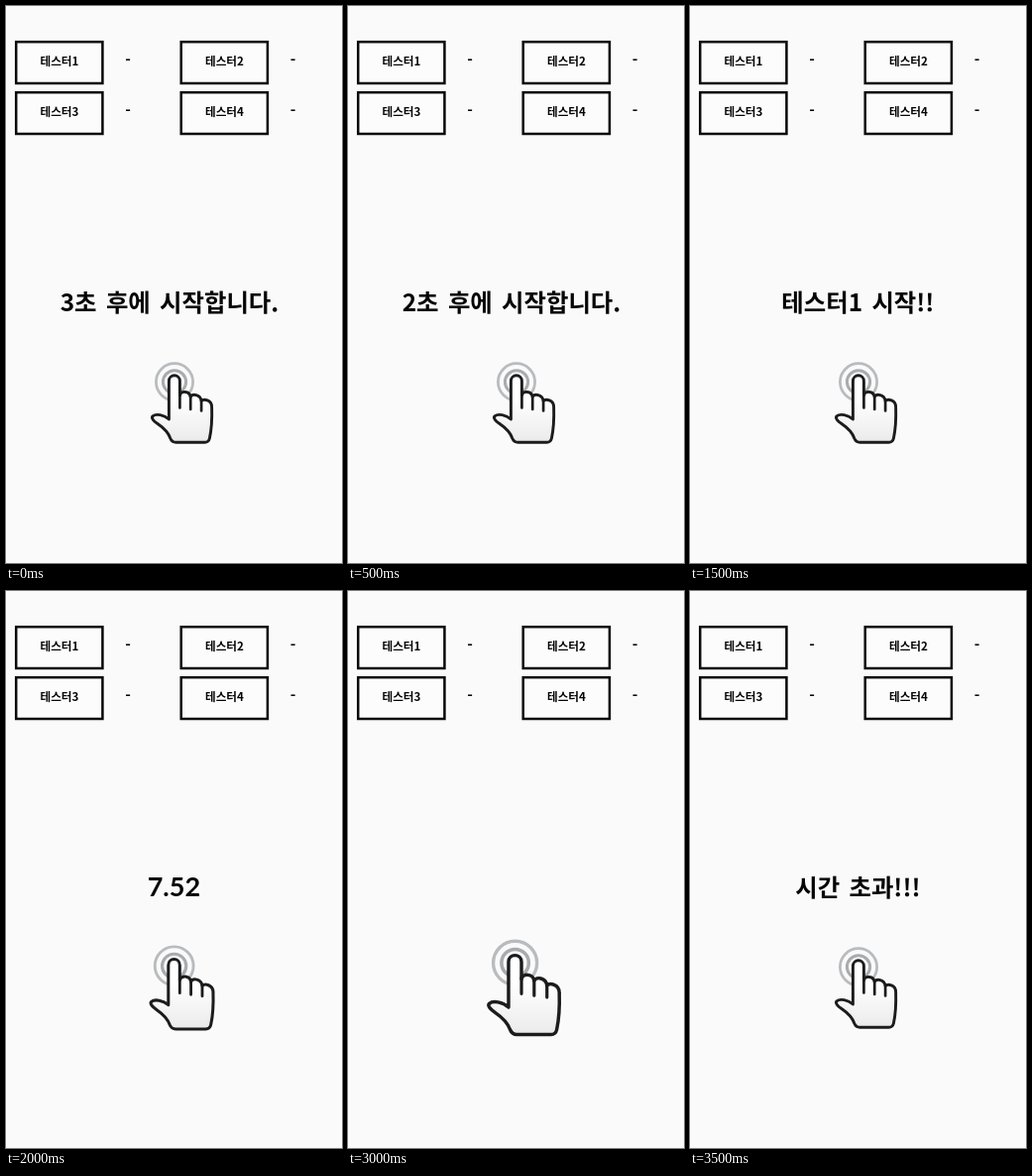
An HTML page for the animation above (4000 ms loop, 339x562 px).

```html
<!DOCTYPE html>
<html lang="ko">
<head>
<meta charset="utf-8">
<title>Tap timer</title>
<style>
html, body { margin: 0; width: 100%; height: 100%; overflow: hidden; background: #fafafa; }
svg { display: block; width: 100vw; height: 100vh; }
text { font-family: "Noto Sans CJK KR", "Noto Sans CJK", sans-serif; font-weight: 900; text-anchor: middle; fill: #050505; }
.label { font-size: 11.6px; }
.score { font-size: 15px; }
#message { font-size: 24.4px; word-spacing: 2.5px; }
#message.digits { font-family: Lato, sans-serif; font-size: 27px; font-weight: 700; word-spacing: 0; }
</style>
</head>
<body>
<svg viewBox="0 0 339 562">
  <defs>
    <linearGradient id="skin" x1="0" y1="0" x2="0" y2="1">
      <stop offset=".35" stop-color="#fff"/>
      <stop offset="1" stop-color="#ebebeb"/>
    </linearGradient>
  </defs>
  <rect width="339" height="562" fill="#fafafa"/>
  <g id="players"></g>
  <text id="message"></text>
  <g id="hand" fill="none" stroke-linecap="round" stroke-linejoin="round">
    <circle cx="170" cy="379.3" r="18.6" stroke="#b9bcbe" stroke-width="2.8"/>
    <circle cx="170" cy="379.3" r="11.6" stroke="#a9acae" stroke-width="3"/>
    <path fill="url(#skin)" stroke="#1c1c1c" stroke-width="2.9" d="M164.4 413V378.5C164.4 370.9 175.4 370.9 175.4 378.5V393
      C176.5 387.8 185.3 388.2 186.2 394.5C188 390.6 196.3 391.8 197.1 398.5
      C199.5 395.8 207.6 397.6 207.6 404.5C208 416 207.4 427 205.4 436.2
      Q204.5 440.2 200.5 440.2H171.5Q167.4 440.2 165.8 436.2
      C163.5 429.5 158.7 425.4 153 421.5C149.5 419 146 416 148 413.8
      C151.2 411 159.5 412.5 164.4 417Z"/>
    <path stroke="#1c1c1c" stroke-width="2.7" d="M175.4 392V405.5M186.2 394V407M197.1 398V408.5"/>
  </g>
</svg>
<script>
const STEP = 500;
const steps = [
  { text: "3초 후에 시작합니다.", x: 165 },
  { text: "2초 후에 시작합니다.", x: 165 },
  { text: "1초 후에 시작합니다.", x: 165 },
  { text: "테스터1 시작!!" },
  { text: "7.52", digits: true, scale: 1.045 },
  { text: "6.52", digits: true, scale: 1.2 },
  { text: "", scale: 1.185 },
  { text: "시간 초과!!!" }
];
const message = document.getElementById("message");
const hand = document.getElementById("hand");

function add(tag, attrs, text) {
  const el = document.createElementNS("http://www.w3.org/2000/svg", tag);
  for (const key in attrs) el.setAttribute(key, attrs[key]);
  if (text) el.textContent = text;
  document.getElementById("players").append(el);
}

for (let i = 0; i < 4; i++) {
  const x = 9 + (i % 2) * 166.5;
  const y = 35 + (i >> 1) * 51;
  add("rect", { x: x + 1.2, y: y + 1.2, width: 87.2, height: 41.8, fill: "#fcfcfc", stroke: "#080808", "stroke-width": 2.5 });
  add("text", { x: x + 44.9, y: y + 25.3, class: "label" }, "테스터" + (i + 1));
  add("text", { x: x + 114, y: y + 24.5, class: "score" }, "-");
}

function draw(time) {
  const { text, x = 169.4, digits = false, scale = 1 } = steps[Math.floor(time / STEP) % steps.length];
  message.textContent = text;
  message.setAttribute("class", digits ? "digits" : "");
  message.setAttribute("x", x);
  message.setAttribute("y", digits ? 308 : 307.8);
  hand.setAttribute("transform", `translate(177.5 400.8) scale(${scale}) translate(-177.5 -400.8)`);
}

const start = performance.now();
function tick() {
  draw(performance.now() - start);
  requestAnimationFrame(tick);
}
tick();
</script>
</body>
</html>
```
